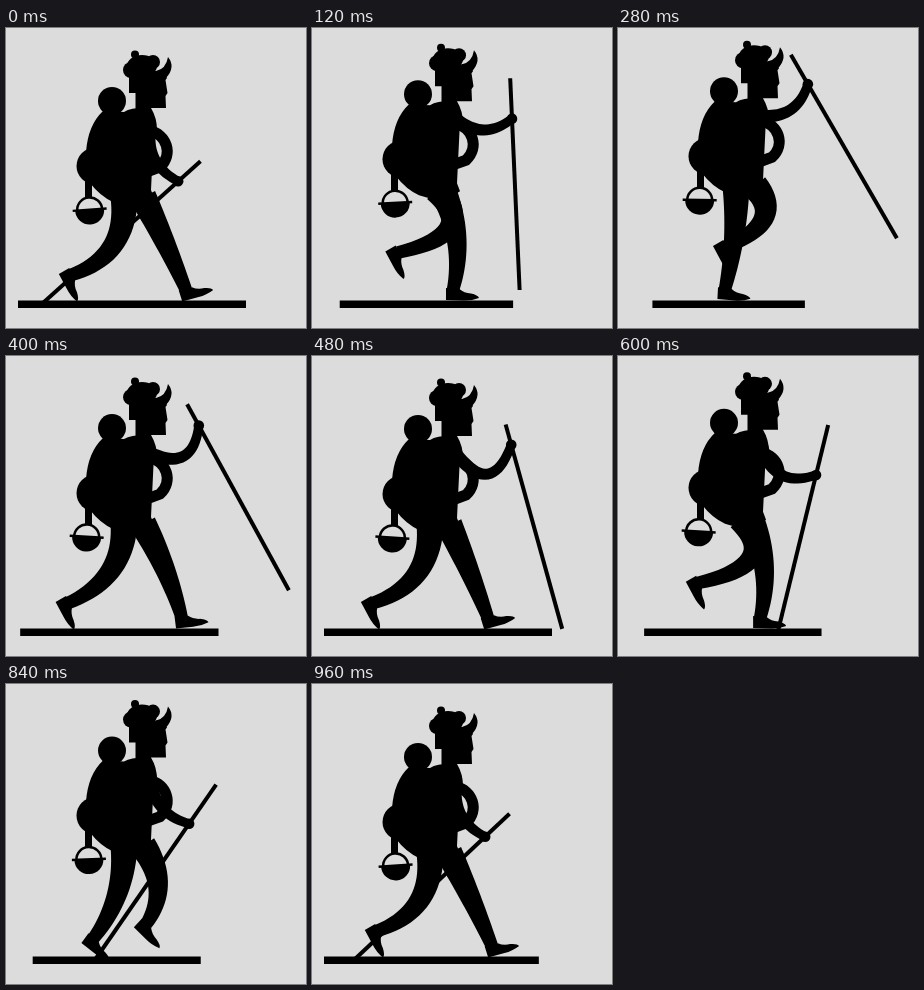
An HTML page with a canvas that plays this animation: 300x300 px, repeating every 1000 ms.

```html
<!DOCTYPE html>
<html lang="en">
<head>
<meta charset="utf-8">
<title>Walking hiker</title>
<style>
html, body { margin: 0; width: 100%; height: 100%; overflow: hidden; background: #dcdcdc; }
canvas { display: block; width: 300px; height: 300px; }
</style>
</head>
<body>
<canvas id="stage" width="300" height="300"></canvas>
<script>
const ctx = document.getElementById('stage').getContext('2d');
const LOOP = 1000, TICK = 40, STEP = 480, STICK = 212, FLOOR = 275;

const rad = deg => deg * Math.PI / 180;
const fillPath = d => ctx.fill(new Path2D(d));

function ease(from, to, x) {
  const u = Math.min(1, Math.max(0, (x - from) / (to - from)));
  return u * u * (3 - 2 * u);
}

// A start value plus eased moves [amount, from, to]
const track = (x, start, ...moves) =>
  moves.reduce((sum, [amount, from, to]) => sum + amount * ease(from, to, x), start);

// Tapered limb; (bx, by) pushes its middle away from the straight line
function limb(x0, y0, x1, y1, bx, by, w0, w1) {
  const cx = (x0 + x1) / 2 + 2 * bx, cy = (y0 + y1) / 2 + 2 * by;
  const left = [], right = [], n = 20;
  for (let i = 0; i <= n; i++) {
    const u = i / n, v = 1 - u;
    const x = v * v * x0 + 2 * u * v * cx + u * u * x1;
    const y = v * v * y0 + 2 * u * v * cy + u * u * y1;
    const dx = v * (cx - x0) + u * (x1 - cx), dy = v * (cy - y0) + u * (y1 - cy);
    const r = (w0 + (w1 - w0) * u) / 2 / Math.hypot(dx, dy);
    left.push([x - dy * r, y + dx * r]);
    right.unshift([x + dy * r, y - dx * r]);
  }
  ctx.beginPath();
  left.concat(right).forEach(p => ctx.lineTo(p[0], p[1]));
  ctx.fill();
}

function disc(x, y, rx, ry = rx) {
  ctx.beginPath();
  ctx.ellipse(x, y, rx, ry, 0, 0, 2 * Math.PI);
  ctx.fill();
}

// q runs from 0 to 1 while the foot is planted and from 1 to 2 while it swings
function leg(q, lift, drift) {
  const hx = track(q, 137, [-19, .15, .4], [19, 1.15, 1.4]), hy = 169 + 1.1 * lift;
  const ax = drift + track(q, 180, [-66, 0, .45], [-49, .52, .85], [42, 1, 1.5], [73, 1.55, 1.85]);
  const ay = track(q, 262, [-15, .55, .85], [-35, 1, 1.42], [50, 1.5, 1.85]);
  const tilt = track(q, -17, [17, 0, .2], [60, .55, .8], [-77, 1.6, 1.9]);
  const kneeX = track(q, 1, [8, 0, .25], [-7, .25, .4], [13, .5, .9], [17, 1, 1.25], [-31, 1.4, 1.92]);
  const kneeY = track(q, 0, [10, .55, .95], [-7, 1.1, 1.4], [-3, 1.5, 1.8]);
  limb(hx, hy, ax, ay, kneeX, kneeY, 27, 12.5);
  ctx.save();
  ctx.translate(ax, ay);
  ctx.rotate(rad(tilt));
  fillPath('M-7 -2 L6.5 -1 Q11 3 18 3.5 Q25 5 26 8 Q18 11 10 10.5 L-7 10 Z');
  ctx.restore();
}

function pot(swing) {
  ctx.fillRect(79, 150, 7, 20);
  ctx.save();
  ctx.translate(82, 158);
  ctx.rotate(rad(-4 * swing));
  ctx.lineWidth = 2.5;
  ctx.beginPath();
  ctx.arc(0, 24, 12.5, Math.PI, 0);
  ctx.stroke();
  ctx.fillRect(-17, 22.5, 34, 2.5);
  ctx.beginPath();
  ctx.arc(0, 24, 14.5, 0, Math.PI);
  ctx.fill();
  ctx.restore();
}

function upperBody(swing) {
  // hat
  disc(129, 26.5, 4);
  disc(125, 42, 8);
  disc(136, 38, 15, 11);
  disc(147, 34, 7);
  fillPath('M150 43 Q160 41 162 29 Q170 39 160 50 L150 51 Z');
  // head and neck
  fillPath('M123 43 H157 L161 50 L159.5 52 L161.5 65 L159.5 68 L160 80 H145 V86 H129.5 V65 H123 Z');
  // pack, coat and tail
  disc(106, 73, 14);
  disc(89, 138, 18.5);
  fillPath('M97 83 L118 84 Q126 79 145 80 Q151 90 151 102 L147.5 110 L145 162 L148 170 ' +
    'L131 181 L107 174 Q94 168 84 155 L80 124 Q82 97 97 83 Z');
  // arm on the hip
  ctx.lineWidth = 11;
  ctx.stroke(new Path2D('M144 103 C160 106 168 126 154 139 L143 143'));
  pot(swing);
}

function armAndStick(t, lift) {
  const sx = 144, sy = 98 + lift;
  const aim = rad(track(t, 63, [-98, 0, .2], [76, .34, .7], [22, .7, 1]));
  const reach = track(t, 62, [-6, 0, .12], [6, .5, .65]);
  const sag = track(t, 11, [14, .3, .48], [-14, .5, .66]);
  const ux = Math.cos(aim), uy = Math.sin(aim);
  const hx = sx + ux * reach, hy = sy + uy * reach;

  // planted, the stick slides through the hand; swinging, it is lifted
  const lean = rad(track(t, -48, [78, 0, .2], [-56, .37, .7], [-22, .72, 1]));
  const dx = Math.sin(lean), dy = Math.cos(lean);
  const above = Math.max(21, STICK - (FLOOR - hy) / dy) + track(t, 0, [13, 0, .12], [-13, .3, .45]);
  const below = Math.min(STICK - above, (FLOOR - hy) / dy);
  ctx.lineWidth = 4;
  ctx.beginPath();
  ctx.moveTo(hx - dx * above, hy - dy * above);
  ctx.lineTo(hx + dx * below, hy + dy * below);
  ctx.stroke();

  limb(sx, sy, hx, hy, -uy * sag, ux * sag, 13, 9);
  disc(hx, hy, 5.3);
}

function draw(ms) {
  const t = ms / LOOP;
  const p = ms < STEP ? ms / STEP : (ms - STEP) / (LOOP - STEP);
  const swing = Math.cos(2 * Math.PI * t), drift = 2 * (swing - 1);
  const rise = track(p, 0, [1, 0, .4], [-1, .55, .9]);
  const lift = -10 * rise;

  ctx.fillStyle = '#dcdcdc';
  ctx.fillRect(0, 0, 300, 300);
  ctx.fillStyle = ctx.strokeStyle = '#000';
  const left = 12 + 23 * rise, right = 240 - 55 * Math.sin(Math.PI * p);
  ctx.fillRect(left, 272.5, right - left, 7.5);

  leg(p, lift, drift);
  leg(1 + p, lift, drift);
  ctx.save();
  ctx.translate(0, lift);
  upperBody(swing);
  ctx.restore();
  armAndStick(t, lift);
}

const start = performance.now();
function play() {
  const now = performance.now() - start;
  draw(Math.floor(now % LOOP / TICK) * TICK);
  requestAnimationFrame(play);
}
play();
</script>
</body>
</html>
```
